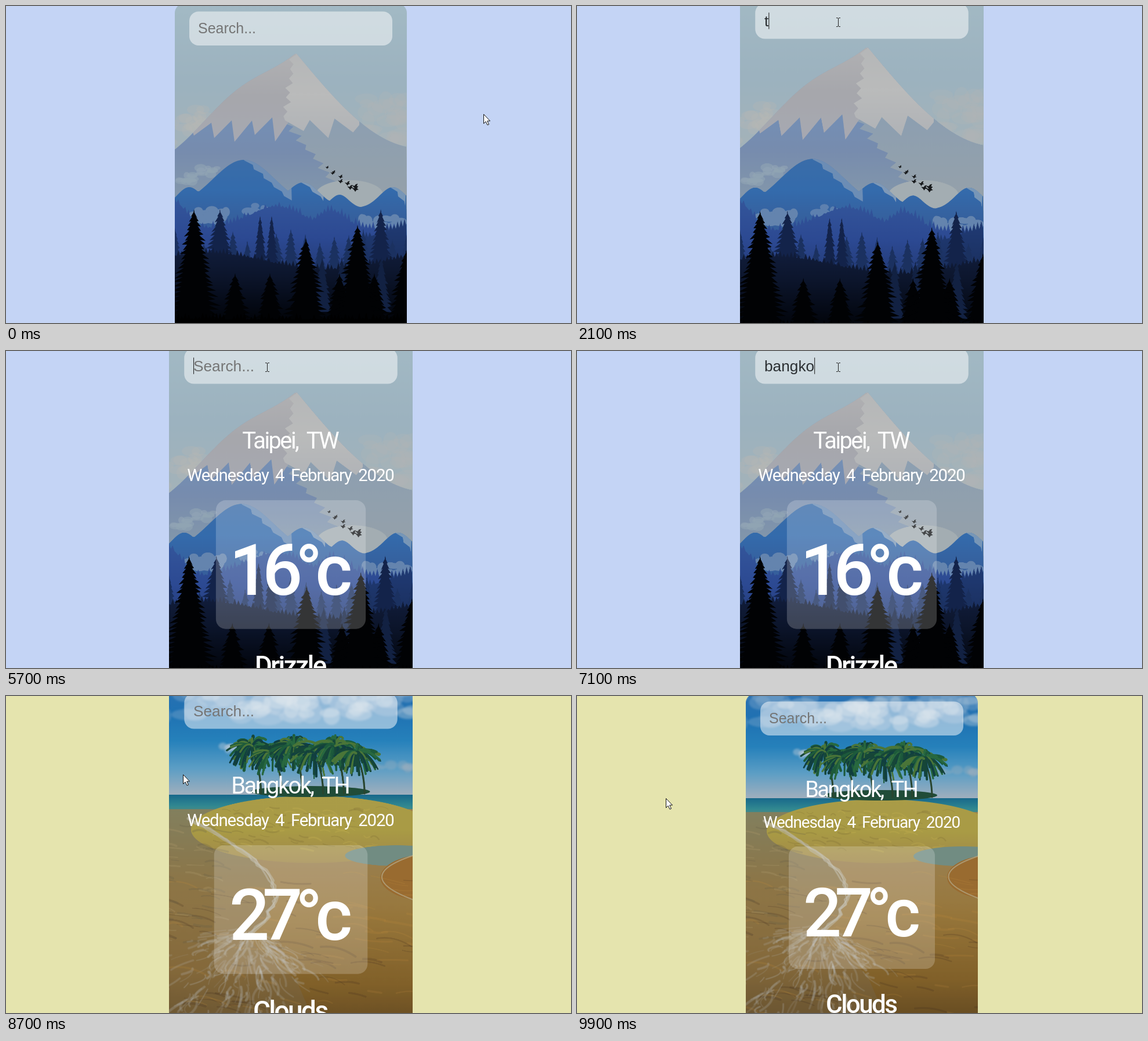
An HTML page with a canvas that plays this animation: 974 px wide and 546 px high, repeating every 10 s.

```html
<!DOCTYPE html>
<html lang="en">
<head>
<meta charset="utf-8">
<title>Weather search</title>
<style>
html, body { margin: 0; width: 100%; height: 100%; overflow: hidden; }
canvas { display: block; }
</style>
</head>
<body>
<canvas id="stage" width="974" height="546"></canvas>
<script>
const ctx = document.getElementById('stage').getContext('2d');
const LOOP = 10000, CX = 491, CY = 297, BOTTOM = 597;
const ENTER = 670, LEAVE = 8735, FADE = 400;
const FOCUS = 1150, FIRST = 4300, SECOND = 7800, BLUR = 8600;

let seed = 7;
const rnd = () => (seed = seed * 16807 % 2147483647) / 2147483647;
const span = (a, b) => a + rnd() * (b - a);
const lerp = (a, b, p) => a + (b - a) * p;
const clamp = v => Math.max(0, Math.min(1, v));
const range = (n, f) => Array.from({ length: n }, (_, i) => f(i));

// CSS "ease" curve
function ease(x) {
  x = clamp(x);
  let lo = 0, hi = 1;
  for (let i = 0; i < 20; i++) {
    const s = (lo + hi) / 2;
    if (0.75 * s * (1 - s) + s ** 3 < x) lo = s; else hi = s;
  }
  return 0.3 * lo * (1 - lo) ** 2 + 3 * lo * lo * (1 - lo) + lo ** 3;
}

function grad(c, y0, y1, ...colors) {
  const g = c.createLinearGradient(0, y0, 0, y1);
  colors.forEach((color, i) => g.addColorStop(i / (colors.length - 1), color));
  return g;
}
function trace(pts) {
  const p = new Path2D();
  pts.forEach(([x, y]) => p.lineTo(x, y));
  return p;
}
function poly(c, fill, pts) {
  c.fillStyle = fill;
  c.fill(trace(pts));
}
function line(c, color, width, path) {
  c.strokeStyle = color;
  c.lineWidth = width;
  c.stroke(path instanceof Path2D ? path : new Path2D(path));
}
function oval(c, fill, x, y, rx, ry) {
  c.fillStyle = fill;
  c.beginPath();
  c.ellipse(x, y, rx, ry, 0, 0, 7);
  c.fill();
}
function puffs(c, color, n, x0, x1, y0, y1, r) {
  for (let i = 0; i < n; i++)
    oval(c, color, span(x0, x1), span(y0, y1), r * span(.6, 1.4), r * span(.4, .9));
}
function scene(x, y, w, h, draw) {
  const cv = document.createElement('canvas');
  cv.width = w * 2;
  cv.height = h * 2;
  const c = cv.getContext('2d');
  c.scale(2, 2);
  c.translate(-x, -y);
  c.lineCap = c.lineJoin = 'round';
  draw(c);
  return cv;
}

// Skyline made of round humps: [centre, height, width]
const humps = (base, ...list) => x =>
  base - Math.max(0, ...list.map(([m, h, w]) => h * Math.exp(-(((x - m) / w) ** 2))));

function outline(f, x0 = 291, x1 = 691, teeth = 0) {
  const pts = [[x0, 600]];
  for (let x = x0; x <= x1; x += 3) pts.push([x, f(x) - (x % 2 ? teeth * rnd() : 0)]);
  return [...pts, [x1 + 3, 600]];
}

function zigzag(from, to, amp) {
  const n = Math.round((to[1] - from[1]) / 8);
  return range(n + 1, j => [
    lerp(from[0], to[0], j / n) + (j % 2 ? amp : -amp) * span(.3, 1),
    lerp(from[1], to[1], j / n)
  ]);
}

// Sunlit face to the right of a ragged line
function litFace(c, fill, from, to) {
  poly(c, fill, [...zigzag(from, to, 4), [to[0], from[1] - 30], [from[0], from[1] - 30]]);
}

function drips(x0, x1, n, y0, y1, lean) {
  const dx = (x1 - x0) / n;
  return range(n, i => [
    [x0 + dx * i, lerp(y0, y1, i / n) + span(-4, 4)],
    [x0 + dx * (i + lean), span(215, 236)]
  ]).flat();
}

function tree(c, x, top, bottom, w, color) {
  const n = Math.round((bottom - top) / 8);
  const side = s => range(n, j => {
    const y = lerp(top, bottom, j / n), r = w * (j / n) ** .75;
    return [[x + s * (r * span(.8, 1.15) + 1), y + span(3, 8)], [x + s * (r * .6 + .5), y + 5]];
  }).flat();
  poly(c, color, [[x, top], ...side(1), ...side(-1).reverse()]);
}

function bird(c, x, y, s) {
  c.save();
  c.translate(x, y);
  c.scale(s, s);
  c.fillStyle = '#17191b';
  c.fill(new Path2D('M-6 -2L-1 -1L1 -4L5 -5L3 -1L6 1L2 2L0 5L-2 2Z'));
  c.restore();
}

function clipped(c, pts, draw) {
  c.save();
  c.clip(trace(pts));
  draw();
  c.restore();
}

function bigPeak(x) {
  const d = x - 500;
  return d > 0 ? 81 + 164 * Math.sin(d / 136) : 81 - d * .795 - 18 * Math.sin(d / 66.5) ** 2;
}

const mountains = scene(291, -114, 400, 711, c => {
  c.fillStyle = grad(c, -114, 260, '#a0b8c5', '#a2b9c4', '#9cb2bf', '#a5b2b8');
  c.fillRect(291, -114, 400, 711);
  puffs(c, 'rgba(181,182,179,.3)', 26, 285, 345, 175, 240, 13);
  puffs(c, 'rgba(174,180,181,.25)', 28, 615, 695, 160, 235, 18);

  clipped(c, outline(bigPeak), () => {
    c.fillStyle = grad(c, 180, 320, '#7390b7', '#778cae', '#8296ab');
    c.fillRect(291, 80, 400, 300);
    poly(c, grad(c, 180, 330, '#8c9fb2', '#95a1aa'),
      [...zigzag([482, 200], [602, 350], 9), [691, 350], [691, 100], [500, 80]]);
    poly(c, grad(c, 80, 235, '#b1b1b3', '#a6a7ac', '#a7a9b2'),
      [[500, 60], [291, 200], ...drips(319, 494, 5, 208, 186, .14), [494, 190]]);
    poly(c, grad(c, 80, 225, '#b5b7b8', '#babbbb', '#b0b3b7'),
      [...zigzag([497, 76], [481, 190], 7), ...drips(481, 609, 3, 196, 190, .75), [609, 205], [609, 60]]);
  });

  puffs(c, 'rgba(146,165,181,.6)', 10, 291, 325, 290, 306, 8);
  puffs(c, 'rgba(146,165,181,.6)', 9, 333, 365, 275, 290, 8);
  oval(c, '#a3adb2', 592, 325, 58, 25);

  const hills = outline(humps(348, [316, 36, 30], [410, 83, 75], [512, 44, 40], [575, 23, 22], [667, 36, 32]));
  poly(c, grad(c, 265, 370, '#3a6da9', '#346bac', '#365f9c'), hills);
  clipped(c, hills, () => {
    litFace(c, '#6c8db5', [414, 266], [490, 335]);
    litFace(c, '#7e99b8', [512, 304], [549, 336]);
    litFace(c, '#7796b7', [665, 312], [691, 344]);
  });
  puffs(c, '#6484ae', 18, 322, 382, 348, 370, 11);
  puffs(c, '#5d80af', 10, 415, 465, 343, 358, 8);
  puffs(c, '#6484ae', 18, 608, 682, 364, 382, 10);

  poly(c, grad(c, 330, 470, '#34569b', '#2c4992', '#21376f'),
    outline(humps(384, [291, 46, 28], [465, 38, 65], [560, 30, 35]), 291, 691, 14));
  poly(c, grad(c, 375, 480, '#203a73', '#182b56'), outline(x => 400 - (x - 618) * .3, 618, 691, 14));
  for (let x = 291; x < 700; x += 25) tree(c, x, span(380, 408), 470, span(13, 19), '#1b3160');
  for (const [x, w] of [[369, 28], [438, 12], [458, 12], [646, 22]])
    tree(c, x, 350 + 12 * (w < 20), 445, w, '#13234a');
  poly(c, grad(c, 420, 560, '#111d3b', '#0c152b', '#050a16', '#000'),
    outline(x => 440 + 14 * Math.sin((x - 450) / 65), 291, 691, 12));
  for (let x = 545; x < 670; x += 34) tree(c, x, 433, 530, 19, '#122142');

  const black = '#010204';
  const front = (x, top) => tree(c, x, top, 598, 26 + (560 - top) * .15, black);
  range(5, i => front(395 + 60 * i, 460));
  [[324, 350], [517, 400], [606, 377], [690, 420]].forEach(p => front(...p));
  poly(c, '#000', outline(() => 540, 291, 691, 12));

  range(9, i => bird(c, 554 + 6.5 * i + span(-5, 5), 282 + 4.6 * i + span(-4, 4), .5 + .06 * i));
});

function palm(c, x, y, r) {
  line(c, '#29452f', 3, `M${x + 14} 174Q${x + 14} 140 ${x} ${y}`);
  for (let i = 0; i < 75; i++) {
    const a = span(0, 6.3), len = r * span(.4, 1.1);
    const ex = x + Math.cos(a) * len, ey = y + Math.sin(a) * len * .65 + len * .3;
    const color = ['#164638', '#1d5a3b', '#28683f', '#113f40', '#4a7538'][i % 5];
    line(c, color, span(2, 5), `M${x} ${y}Q${(x + ex) / 2} ${Math.min(y, ey) - 8} ${ex} ${ey}`);
  }
}

const shore = y => 320 + 145 * Math.sin((y - 213) / 81);
const shoreLine = (y0, y1, wobble) =>
  range(24, i => lerp(y0, y1, i / 23)).map(y => [shore(y) + span(-wobble, wobble), y]);

function strokes(c, colors, n, x0, x1, y0, y1, len, width) {
  for (let i = 0; i < n; i++) {
    const w = len * span(.3, 1);
    line(c, colors[i % colors.length], width * span(.3, 1),
      `M${span(x0, x1)} ${span(y0, y1)}q${w / 2} ${span(-6, 6)} ${w} ${span(0, w * .3)}`);
  }
}

const beach = scene(126, -3, 730, 600, c => {
  c.fillStyle = grad(c, -3, 178, '#2b71b2', '#1f72b3', '#2681bb', '#5c9ec5', '#a3b0bd');
  c.fillRect(126, -3, 730, 190);
  c.filter = 'blur(3px)';
  puffs(c, 'rgba(139,174,205,.35)', 60, 126, 856, 0, 50, 22);
  puffs(c, 'rgba(190,207,221,.4)', 28, 330, 720, 8, 48, 17);
  puffs(c, 'rgba(173,195,213,.5)', 7, 378, 400, 96, 102, 8);
  puffs(c, 'rgba(150,172,190,.4)', 8, 625, 690, 127, 135, 9);
  c.filter = 'none';

  c.fillStyle = grad(c, 175, 215, '#17678b', '#328991', '#818664');
  c.fillRect(126, 176, 730, 40);
  c.fillStyle = grad(c, 195, 597, '#82805f', '#8d7546', '#8c6f3e', '#6b5633');
  c.fillRect(126, 200, 730, 397);
  poly(c, grad(c, 270, 597, '#9a8050', '#98773b', '#8a672c', '#624822'),
    [...shoreLine(235, 410, 2), [500, 480], [550, 597], [856, 597], [856, 200], [500, 200]]);
  oval(c, grad(c, 178, 290, '#aa9c48', '#a99b45', '#a0874a'), 525, 233, 198, 55);
  strokes(c, ['rgba(195,174,80,.3)', 'rgba(130,112,53,.3)'], 80, 360, 640, 195, 265, 24, 3);
  oval(c, '#718c82', 665, 276, 85, 17);
  oval(c, '#996b30', 722, 312, 84, 39);
  line(c, 'rgba(182,171,140,.7)', 2, 'M691 276Q590 310 691 348');
  strokes(c, ['rgba(185,137,62,.22)', 'rgba(65,48,30,.2)'], 170, 126, 840, 305, 595, 65, 4);
  strokes(c, ['rgba(168,148,103,.3)', 'rgba(100,92,70,.25)'], 80, 180, 370, 225, 420, 40, 4);

  for (const w of [5, 3, 2]) line(c, 'rgba(185,181,166,.5)', w, trace(shoreLine(215, 410, 5)));

  // Foam fans out from the end of the stream
  c.filter = 'blur(1px)';
  for (let i = 0; i < 230; i++) {
    const a = span(.5, 3), d = span(8, 190) * (a < 1.2 ? .75 : 1), len = span(10, 40);
    const x = 425 + Math.cos(a) * d * .95, y = 392 + Math.sin(a) * d;
    const dx = Math.cos(a) * len, dy = Math.sin(a) * len;
    line(c, `rgba(188,187,182,${span(.15, .4)})`, span(1, 4.5),
      `M${x} ${y}q${dx / 2 + span(-14, 14)} ${dy / 2} ${dx + span(-10, 10)} ${dy}`);
  }
  c.filter = 'none';

  oval(c, '#204c38', 523, 171, 98, 9);
  range(6, i => palm(c, 428 + 34 * i, 96 + 12 * (i % 2), 40));
  c.fillStyle = grad(c, 350, 597, 'rgba(0,0,0,0)', 'rgba(0,0,0,.12)');
  c.fillRect(126, 350, 730, 247);
});

// Both pictures share one blended size, cover the panel and stand on its bottom edge.
function drawBackground(p) {
  const w = lerp(1080, 500, p), h = lerp(1920, 411, p);
  const s = Math.max(400 / w, 600 / h);
  const box = [CX - w * s / 2, BOTTOM - h * s, w * s, h * s];
  if (p < 1) ctx.drawImage(mountains, ...box);
  ctx.globalAlpha = p;
  if (p > 0) ctx.drawImage(beach, ...box);
  ctx.globalAlpha = 1;
}

function label(text, y, size, weight, spacing) {
  ctx.font = `${weight} ${size}px Roboto, "Liberation Sans", sans-serif`;
  ctx.letterSpacing = size * spacing + 'px';
  ctx.wordSpacing = size * .18 + 'px';
  ctx.textAlign = 'center';
  ctx.fillStyle = '#fff';
  ctx.fillText(text, CX + size * spacing / 2, y);
  ctx.letterSpacing = ctx.wordSpacing = '0px';
}
function rounded(x, y, w, h, fill) {
  ctx.beginPath();
  ctx.roundRect(x, y, w, h, 16);
  ctx.fillStyle = fill;
  ctx.fill();
}
function drawWeather(city, temp, sky, boxWidth) {
  label(city, 174, 38, 400, -.065);
  label('Wednesday 4 February 2020', 227, 28, 400, -.04);
  rounded(CX - boxWidth / 2, 259, boxWidth, 211, 'rgba(255,255,255,.2)');
  label(temp, 414, 116, 500, -.1);
  label(sky, 546, 44, 500, -.06);
}

const words = [
  { text: 'taipei', start: 2000, step: 250, end: FIRST },
  { text: 'bangkok', start: 6000, step: 200, end: SECOND }
];
function inputState(t) {
  let typed = '', last = FOCUS;
  for (const { text, start, step, end } of words) {
    if (t >= end) last = end;
    else if (t >= start) {
      const n = Math.min(text.length, Math.floor((t - start) / step) + 1);
      typed = text.slice(0, n);
      last = start + (n - 1) * step;
    }
  }
  return { typed, caret: t >= FOCUS && t < BLUR && (t - last) % 1000 < 500 };
}
function drawSearch(t) {
  const { typed, caret } = inputState(t);
  rounded(316, 9.5, 350, 58.5, 'rgba(255,255,255,.5)');
  ctx.font = '25px "Liberation Sans", Arial, sans-serif';
  ctx.textAlign = 'left';
  ctx.fillStyle = typed ? '#2b2f32' : '#757575';
  ctx.fillText(typed || 'Search...', 331, 47);
  if (caret) {
    ctx.fillStyle = '#222';
    ctx.fillRect(331 + ctx.measureText(typed).width, 25, 1, 27);
  }
}

// Pointer stops: time, x, y
const path = [
  [0, 823, 186], [450, 805, 172], [900, 469, 29], [FOCUS, 450, 28],
  [8300, 450, 28], [8700, 305, 135], [9050, 153, 176], [LOOP, 153, 176]
];
function drawPointer(t) {
  const i = path.findIndex(k => k[0] > t);
  const [t0, x0, y0] = path[i - 1], [t1, x1, y1] = path[i];
  const p = (t - t0) / (t1 - t0);
  const x = Math.round(lerp(x0, x1, p)), y = Math.round(lerp(y0, y1, p));
  ctx.save();
  ctx.translate(x, y);
  if (x > 307 && x < 675 && y < 57) {
    line(ctx, '#222', 1, 'M-3 -7.5H-1L.5 -6.5L2 -7.5H4M.5 -6.5V6.5M-3 7.5H-1L.5 6.5L2 7.5H4');
  } else {
    const arrow = new Path2D('M.5 .5V16.5L4 13L7 19L9.5 18L6.7 12H11.5Z');
    ctx.fillStyle = '#fff';
    ctx.fill(arrow);
    line(ctx, '#111', 1, arrow);
  }
  ctx.restore();
}

function draw(now) {
  const t = now % LOOP;
  ctx.fillStyle = t < SECOND ? '#c4d4f5' : '#e5e4ae';
  ctx.fillRect(0, 0, 974, 546);

  const zoom = 1 + .05 * (ease((t - ENTER) / FADE) - ease((t - LEAVE) / FADE));
  ctx.save();
  ctx.translate(CX, CY);
  ctx.scale(zoom, zoom);
  ctx.translate(-CX, -CY);
  ctx.beginPath();
  ctx.roundRect(291, -4, 400, 601, 16);
  ctx.clip();
  drawBackground(ease((t - SECOND) / FADE));
  drawSearch(t);
  if (t >= SECOND) drawWeather('Bangkok, TH', '27°c', 'Clouds', 252);
  else if (t >= FIRST) drawWeather('Taipei, TW', '16°c', 'Drizzle', 246);
  ctx.restore();

  drawPointer(t);
  requestAnimationFrame(() => draw(performance.now() - begin));
}
const begin = performance.now();
draw(0);
</script>
</body>
</html>
```
